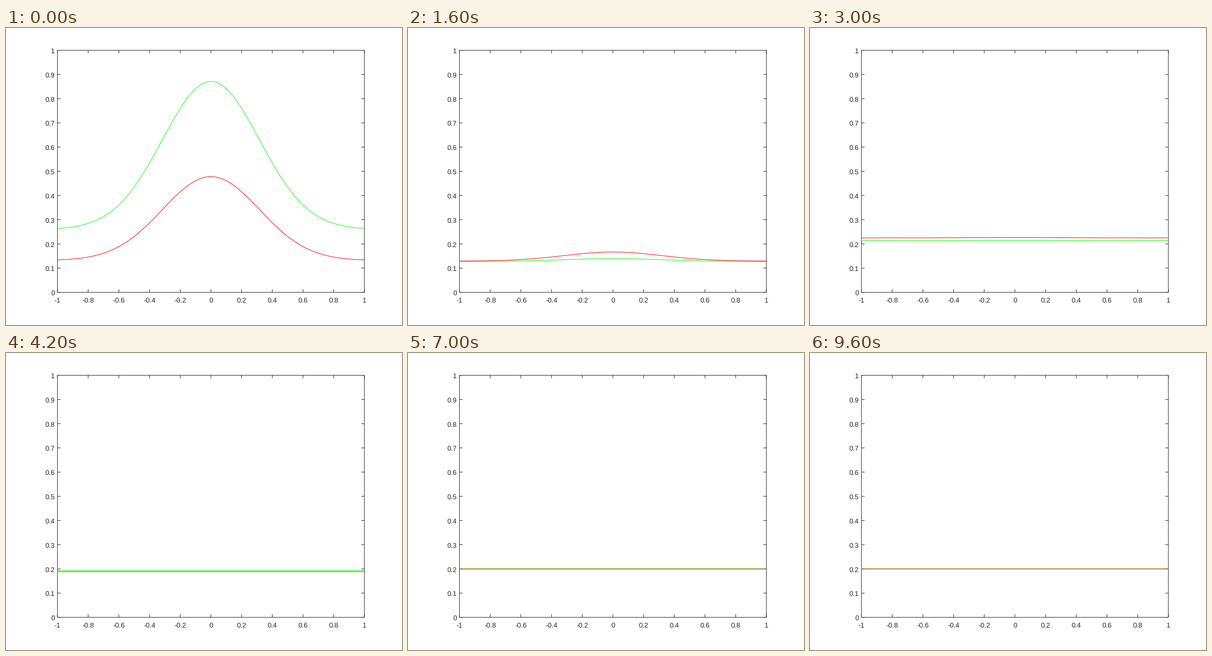
Write a matplotlib script that moves like this. It is 864x648 px and loops after 10 s.

```python
import numpy as np
import matplotlib.pyplot as plt
from matplotlib.animation import FuncAnimation
from matplotlib.collections import LineCollection
from matplotlib.patches import Rectangle

W, H, DPI = 864, 648, 72  # at 72 dpi one point is one pixel
LEFT, RIGHT = 0.13 * W, 0.905 * W
TOP, BOTTOM = 0.075 * H, 0.89 * H
INK = "#262626"
TICK = 6.7
FRAME_WIDTH, CURVE_WIDTH = 1.15, 1.12

STEPS, INTERVAL = 50, 200
LAST_STEP = 48
REST = 0.2       # level both curves settle at
SWING = 6.05     # steps from one late turning point to the next
SHRINK = -0.42   # how each late swing follows the one before

plt.rcParams["font.family"] = "Liberation Sans"
plt.rcParams["font.size"] = 15
plt.rcParams["text.hinting"] = "none"


def px(x):
    return LEFT + (RIGHT - LEFT) * (x + 1) / 2


def py(y):
    return BOTTOM - (BOTTOM - TOP) * y


def turning_points(first, start, offset):
    """First swings as given, then a shrinking series around the rest level."""
    tail = [(start + SWING * k, REST + offset * SHRINK**k) for k in range(7)]
    return first + tail


GREEN_TURNS = turning_points([(0, 0.264), (7.1, 0.115), (11.6, 0.2455)],
                             18.3, -0.0153)
RED_TURNS = turning_points([(0, 0.134), (1.6, 0.187), (8.2, 0.1293),
                            (13.2, 0.2335)], 19.6, -0.0138)


def level(t, turns):
    times = [time for time, _ in turns]
    k = min(np.searchsorted(times, t, side="right") - 1, len(turns) - 2)
    (t0, v0), (t1, v1) = turns[k], turns[k + 1]
    part = (t - t0) / (t1 - t0)
    if k == 0:
        ease = 1 - (1 - part)**3
    else:
        ease = (1 - np.cos(np.pi * part)) / 2
    return v0 + (v1 - v0) * ease


x = np.linspace(-1, 1, 201)
bump = (np.exp(-5 * x**2) - np.exp(-5)) / (1 - np.exp(-5))


def green_curve(t):
    height = 0.607 * np.exp(-0.49 * t)
    return level(t, GREEN_TURNS) + height * bump


def red_curve(t):
    # follows the green bump with a lag
    height = 2.466 * np.exp(-0.49 * t) - 2.122 * np.exp(-0.65 * t)
    return level(t, RED_TURNS) + height * bump


fig = plt.figure(figsize=(W / DPI, H / DPI), dpi=DPI, facecolor="white")
ax = fig.add_axes([0, 0, 1, 1])
ax.set_xlim(0, W)
ax.set_ylim(H, 0)
ax.axis("off")

ax.add_patch(Rectangle((LEFT, TOP), RIGHT - LEFT, BOTTOM - TOP, fill=False,
                       edgecolor=INK, lw=FRAME_WIDTH, snap=False))
ticks = []
for k in range(11):
    cx, cy = px((k - 5) / 5), py(k / 10)
    ticks += [[(cx, BOTTOM), (cx, BOTTOM - TICK)],
              [(cx, TOP), (cx, TOP + TICK)],
              [(LEFT, cy), (LEFT + TICK, cy)],
              [(RIGHT, cy), (RIGHT - TICK, cy)]]
    ax.text(cx, 598.6, f"{(k - 5) / 5:g}", ha="center", va="baseline",
            color=INK)
    ax.text(106.4, cy + 6.3, f"{k / 10:g}", ha="right", va="baseline",
            color=INK)
ax.add_collection(LineCollection(ticks, colors=INK, linewidths=FRAME_WIDTH,
                                 snap=False), autolim=False)


def add_curve(color, zorder):
    line, = ax.plot(px(x), py(0 * x), color=color, lw=CURVE_WIDTH,
                    zorder=zorder, snap=False, solid_capstyle="butt",
                    scalex=False, scaley=False)
    return line


green = add_curve((0, 1, 0), 3)
red = add_curve((1, 0, 0), 4)


def draw(i):
    step = min(i, LAST_STEP)
    green.set_ydata(py(green_curve(step)))
    red.set_ydata(py(red_curve(step)))
    return green, red


anim = FuncAnimation(fig, draw, frames=STEPS, interval=INTERVAL,
                     repeat=True, repeat_delay=0)
plt.show()
```
